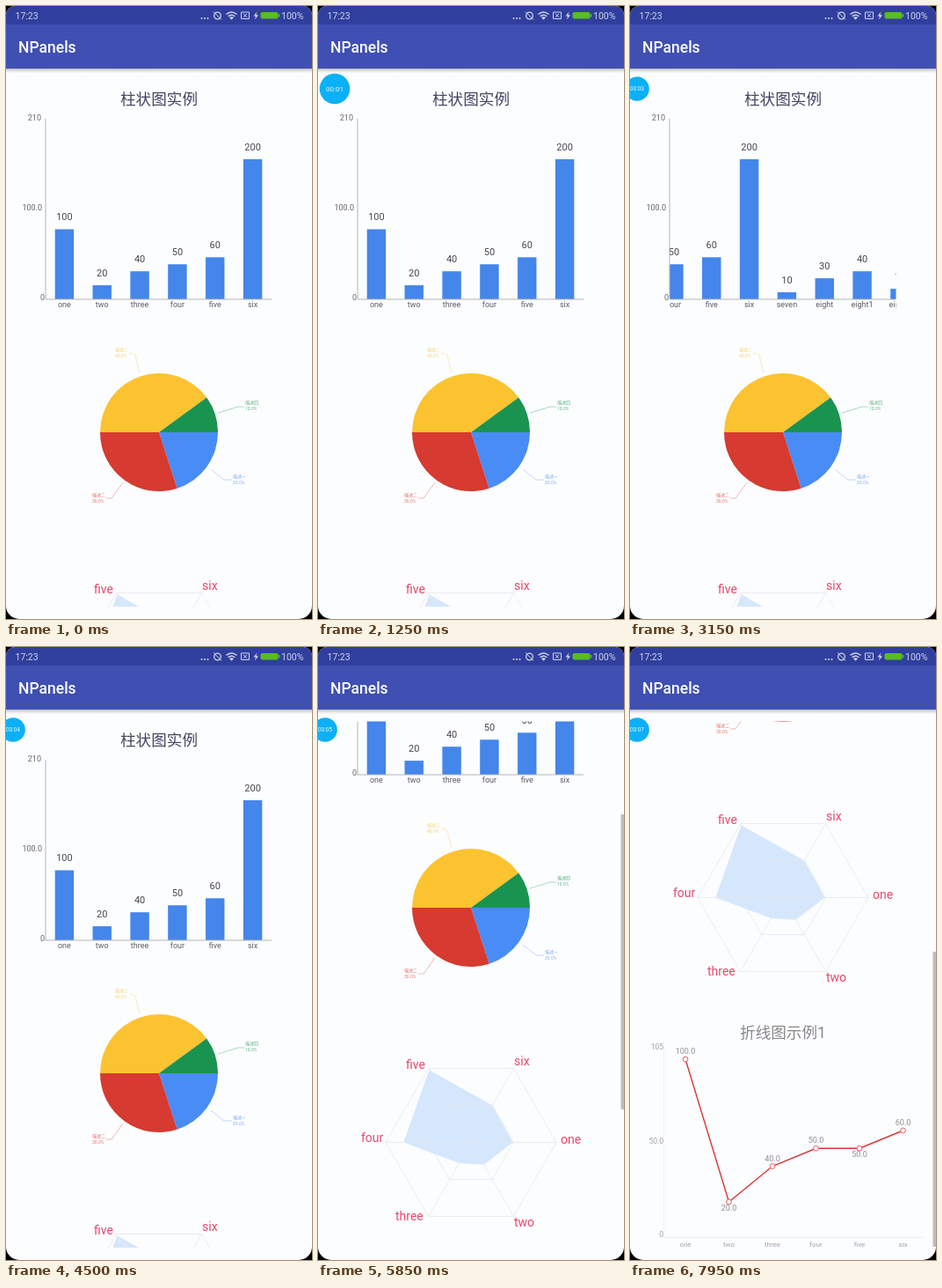
An HTML page for the animation above (8 s loop, 348 by 696 pixels).

```html
<!DOCTYPE html>
<html lang="zh">
<head>
<meta charset="utf-8">
<title>Charts</title>
<style>
  html, body { margin: 0; width: 100%; height: 100%; overflow: hidden; background: #000; }
  svg { display: block; width: 348px; height: 696px; background: #fcfdff; border-radius: 10px 10px 15px 15px; }
  text { font-family: Roboto, "Noto Sans CJK SC", "Noto Sans CJK", "Noto Sans", sans-serif; }
</style>
</head>
<body>
<svg id="stage" viewBox="0 0 348 696">
  <defs>
    <clipPath id="view"><rect y="84.5" width="348" height="597.5"/></clipPath>
    <clipPath id="plot"><rect x="45" y="120" width="257.5" height="230"/></clipPath>
    <linearGradient id="shade" x2="0" y2="1">
      <stop offset="0" stop-color="#808088" stop-opacity=".55"/>
      <stop offset="1" stop-color="#d8d8dc" stop-opacity="0"/>
    </linearGradient>
  </defs>
</svg>
<script>
const NS = 'http://www.w3.org/2000/svg';
const LOOP = 8000;
const stage = document.getElementById('stage');

function add(parent, tag, attrs = {}) {
  const el = document.createElementNS(NS, tag);
  for (const key in attrs) el.setAttribute(key, attrs[key]);
  return parent.appendChild(el);
}
function label(parent, str, x, y, size, fill, anchor = 'start') {
  const el = add(parent, 'text', { x, y, 'font-size': size, fill, 'text-anchor': anchor });
  el.textContent = str;
  return el;
}
const stroke = (parent, d, color, width = 1) =>
  add(parent, 'path', { d, fill: 'none', stroke: color, 'stroke-width': width });
const polar = (cx, cy, r, deg) => {
  const a = deg * Math.PI / 180;
  return [cx + r * Math.cos(a), cy + r * Math.sin(a)];
};

const view = add(stage, 'g', { 'clip-path': 'url(#view)' });
const page = add(view, 'g');

// Bar chart
const STEP = 257 / 6;
const BASE = 333;
label(page, '柱状图实例', 174, 111.5, 17.6, '#444460', 'middle');
const plot = add(page, 'g', { 'clip-path': 'url(#plot)' });
const bars = add(plot, 'g');
[['one', 100], ['two', 20], ['three', 40], ['four', 50], ['five', 60], ['six', 200],
 ['seven', 10], ['eight', 30], ['eight1', 40], ['eight2', 15]].forEach(([name, value], i) => {
  const x = 45 + STEP * (i + .5);
  const h = value * .795;
  add(bars, 'rect', { x: x - STEP / 4, y: BASE - h, width: STEP / 2, height: h, fill: '#4486ea' });
  label(bars, value, x, BASE - h - 10.3, 11, '#46464c', 'middle');
  label(bars, name, x, 342, 9, '#5c5c62', 'middle');
});
stroke(page, 'M45 128V333H302', '#b4b4b4');
label(page, '210', 40, 129.5, 9, '#66666a', 'end');
label(page, '100.0', 41, 232, 9, '#66666a', 'end');
label(page, '0', 44, 334, 9, '#66666a', 'end');

// Pie chart
const PX = 174, PY = 484, PR = 67;
let turn = 0;
[
  [20, '#4a8cf5', '描述一', 258, 536, 'M233 526L248 538H257'],
  [30, '#d63a30', '描述二', 98, 557, 'M133 541L120 559H114'],
  [40, '#fcc330', '描述三', 124, 391.5, 'M152 417L147 396L140 394'],
  [10, '#1a9350', '描述四', 272, 452, 'M241 462L264 455H271']
].forEach(([share, fill, name, x, y, lead]) => {
  const end = turn + share * 3.6;
  add(page, 'path', {
    d: `M${PX} ${PY}L${polar(PX, PY, PR, turn)}A${PR} ${PR} 0 0 1 ${polar(PX, PY, PR, end)}Z`, fill
  });
  turn = end;
  const note = add(page, 'g', { opacity: .7 });
  stroke(note, lead, fill, .5);
  label(note, name, x, y, 5, fill);
  label(note, share + '.0%', x, y + 7.3, 5, fill);
});

// Radar chart
const RX = 174, RY = 750.5, RR = 97;
const hexagon = scales => 'M' + scales.map((s, i) => polar(RX, RY, RR * s, i * 60)).join('L') + 'Z';
add(page, 'path', { d: hexagon([.49, .3, .28, .79, .98, .5]), fill: '#d5e7fd' });
[.5, 1].forEach(s => stroke(page, hexagon(Array(6).fill(s)), '#e8e8ea', .8));
for (let i = 0; i < 6; i++) stroke(page, `M${RX} ${RY}L${polar(RX, RY, RR, i * 60)}`, '#e8e8ea', .8);
[['one', 276, 752], ['two', 223, 846], ['three', 88, 839],
 ['four', 49, 750], ['five', 100, 667], ['six', 223, 663]]
  .forEach(([name, x, y]) => label(page, name, x, y, 14, '#e8486a'));

// Line chart
label(page, '折线图示例1', 174, 910, 17.6, '#88888a', 'middle');
stroke(page, 'M38.5 916V1136.5H335', '#eeeeee', .8);
[['105', 923], ['50.0', 1030], ['0', 1136]]
  .forEach(([s, y]) => label(page, s, 38, y, 8.5, '#a2a2a4', 'end'));
const points = [['one', 100], ['two', 20], ['three', 40], ['four', 50], ['five', 50], ['six', 60]]
  .map(([name, value], i) => ({ name, value, x: 63 + i * 49.5, y: 1136.5 - value * 2.025 }));
stroke(page, 'M' + points.map(p => [p.x, p.y]).join('L'), '#d93636', 1.4);
points.forEach((p, i) => {
  add(page, 'circle', { cx: p.x, cy: p.y, r: 2.9, fill: '#fcfdff', stroke: '#e2615c' });
  const below = i === 1 || i === 4;
  label(page, p.value + '.0', p.x, p.y + (below ? 10 : -6), 9, '#909092', 'middle');
  label(page, p.name, p.x, 1147, 8, '#a2a2a4', 'middle');
});

const thumb = add(stage, 'rect', { x: 344.5, width: 3.5, height: 335, fill: '#bcbcbe' });

// App bar and status bar
add(stage, 'rect', { y: 71, width: 348, height: 6, fill: 'url(#shade)' });
add(stage, 'rect', { y: 20, width: 348, height: 51, fill: '#3f4fb2' });
add(stage, 'rect', { width: 348, height: 21, fill: '#303f9d' });
label(stage, 'NPanels', 14, 53, 17.5, '#fff').setAttribute('font-weight', 500);
const ICON = '#d0d4ea';
label(stage, '17:23', 10.5, 15, 10.5, ICON);
label(stage, '100%', 313, 15, 10.5, ICON);
[222.5, 226, 229.5].forEach(x => add(stage, 'circle', { cx: x, cy: 14, r: 1, fill: ICON }));
add(stage, 'circle', { cx: 240.5, cy: 11, r: 3.8, fill: 'none', stroke: ICON, 'stroke-width': 1.3 });
stroke(stage, 'M236 6.5L245 15.5', ICON);
stroke(stage, 'M250.5 9.5Q256.5 4.5 262.5 9.5M252.7 11.8Q256.5 8.6 260.3 11.8', ICON, 1.4);
add(stage, 'path', { d: 'M254 13Q256.5 11.5 259 13L256.5 15.8Z', fill: ICON });
stroke(stage, 'M267.5 7H276.5V14.5H267.5ZM270 8.8L274 12.8M274 8.8L270 12.8', ICON);
add(stage, 'path', { d: 'M285.5 6.5L281.5 11.5H284L283 15.5L287 10.3H284.5Z', fill: ICON });
add(stage, 'rect', { x: 289.5, y: 7, width: 20, height: 7.5, rx: 2, fill: '#58bc22' });
add(stage, 'rect', { x: 310, y: 9, width: 1.3, height: 3.5, fill: '#58bc22' });

// Recording bubble
const bubble = add(stage, 'g');
add(bubble, 'circle', { r: 17.3, fill: '#0cb0f6' });
const clock = label(bubble, '', 0, 2.9, 8, '#e6f8ff', 'middle');

// Tracks of [time, value], eased between neighbours
const tracks = {
  slide: [[1500, 0], [3100, 145], [3200, 145], [3550, 172], [4000, 172], [4250, 0]],
  scroll: [[4850, 0], [5650, 188], [5900, 188], [6500, 334], [7430, 334], [7950, 466]],
  thumb: [[4830, 0], [4900, 1], [6900, 1], [7150, 0], [7430, 0], [7480, 1]],
  show: [[300, 0], [550, 1]],
  dock: [[2650, 0], [2900, 1]]
};
function sample(name, t) {
  const track = tracks[name];
  const next = track.findIndex(([time]) => time > t);
  if (next === 0) return track[0][1];
  if (next < 0) return track[track.length - 1][1];
  const [t0, a] = track[next - 1], [t1, b] = track[next];
  const u = (t - t0) / (t1 - t0);
  return a + (b - a) * u * u * (3 - 2 * u);
}

function render(t) {
  const scroll = sample('scroll', t);
  const dock = sample('dock', t);
  bars.setAttribute('transform', `translate(${-sample('slide', t)} 0)`);
  page.setAttribute('transform', `translate(0 ${-scroll})`);
  thumb.setAttribute('y', 84.5 + scroll * .561);
  thumb.setAttribute('opacity', sample('thumb', t));
  bubble.setAttribute('transform', `translate(${19 - 11 * dock} 94) scale(${1 - .2 * dock})`);
  bubble.setAttribute('opacity', sample('show', t));
  clock.textContent = '00:0' + Math.floor(t / 1000);
}

const start = performance.now();
function tick() {
  render((performance.now() - start) % LOOP);
  requestAnimationFrame(tick);
}
tick();
</script>
</body>
</html>
```
